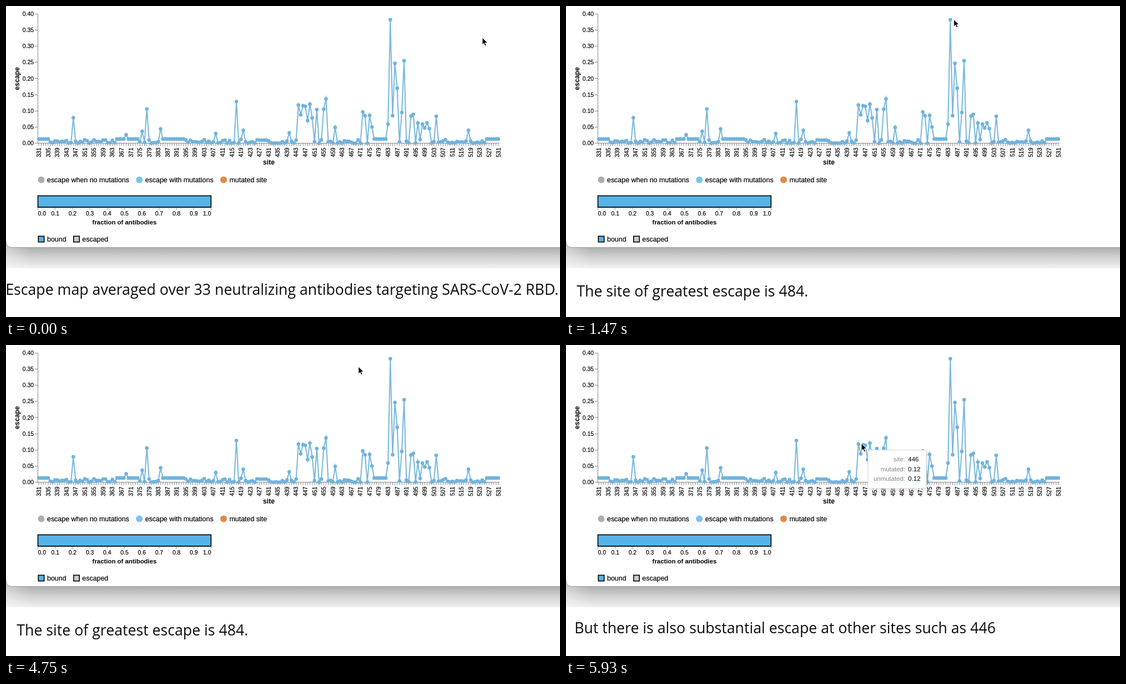
Recreate the animation shown at these times as an HTML page. Size 998x561 px, loop 8 s.

```html
<!DOCTYPE html>
<html lang="en">
<head>
<meta charset="utf-8">
<title>Escape map</title>
<style>
  html, body { margin: 0; width: 100%; height: 100%; overflow: hidden; background: #fff; }
  svg { display: block; width: 998px; height: 561px; }
  text { font-family: "Liberation Sans", Arial, sans-serif; fill: #000; white-space: pre; }
  .label, .legend { stroke: #000; stroke-width: .2px; }
  .label { font-size: 10.4px; }
  .title { font-size: 12.2px; font-weight: bold; }
  .small { font-size: 11.4px; font-weight: bold; }
  .legend { font-size: 12.43px; }
  .tip { font-size: 11.4px; }
  .caption { font-family: "Open Sans", "Noto Sans", sans-serif; font-size: 26.7px; fill: #0c0c0c; }
</style>
</head>
<body>
<svg viewBox="0 0 998 561" xmlns="http://www.w3.org/2000/svg">
  <defs>
    <linearGradient id="shade" x1="0" y1="0" x2="0" y2="1">
      <stop offset=".2" stop-color="#aaa"/>
      <stop offset=".6" stop-color="#d2d2d2"/>
      <stop offset="1" stop-color="#f0f0f0"/>
    </linearGradient>
    <linearGradient id="fade" x1="0" y1="0" x2="1" y2="0">
      <stop offset="0" stop-color="#fff" stop-opacity=".4"/>
      <stop offset="1" stop-color="#fff" stop-opacity="0"/>
    </linearGradient>
    <filter id="drop" x="-10%" y="-10%" width="125%" height="130%">
      <feDropShadow dx="2" dy="2" stdDeviation="2" flood-opacity=".12"/>
    </filter>
  </defs>
  <rect width="998" height="561" fill="#fff"/>
  <rect y="424" width="998" height="49" fill="url(#shade)"/>
  <rect y="424" width="45" height="49" fill="url(#fade)"/>
  <path d="M0 0H998V435.5H11Q0 435.5 0 424Z" fill="#fff"/>
  <path d="M0 424Q0 435.5 11 435.5H998" fill="none" stroke="#a0a0a0"/>
  <g id="chart"></g>
  <text id="caption" class="caption"></text>
  <g id="tip">
    <rect width="105" height="69.5" rx="3" fill="#fff" fill-opacity=".95" stroke="#d9d9d9" filter="url(#drop)"/>
  </g>
  <path id="cursor" d="M0 0V13.2L3 10.4L5.2 15L7.5 14L5.3 9.5H9.4Z" fill="#000" stroke="#fff"/>
</svg>
<script>
const $ = id => document.getElementById(id);
const chart = $("chart"), tip = $("tip"), caption = $("caption"), cursor = $("cursor");

function add(parent, tag, attrs, text) {
  const el = document.createElementNS("http://www.w3.org/2000/svg", tag);
  for (const k in attrs) el.setAttribute(k, attrs[k]);
  if (text !== undefined) el.textContent = text;
  parent.appendChild(el);
  return el;
}
const move = (x, y, turn = 0) => `translate(${x} ${y}) rotate(${turn})`;
const label = (cls, x, y, text, anchor = "start", turn = 0) =>
  add(chart, "text", { class: cls, "text-anchor": anchor, transform: move(x, y, turn) }, text);
const stroke = d => add(chart, "path", { d, fill: "none", stroke: "#888" });
const box = (x, y, width, height, fill) =>
  add(chart, "rect", { x, y, width, height, fill, stroke: "#111", "stroke-width": 1.8 });

// Escape in thousandths: main peaks over a low seeded baseline
const FIRST = 331, LAST = 531;
const peaks = {
  346: 79, 369: 26, 376: 37, 378: 106, 384: 44, 408: 30, 417: 129, 420: 40, 440: 32,
  444: 118, 445: 88, 446: 116, 447: 114, 448: 70, 449: 121, 450: 78, 452: 104, 455: 105, 456: 137,
  460: 49, 472: 97, 473: 85, 475: 86, 476: 50, 483: 59, 484: 382, 485: 85, 486: 247, 487: 170,
  489: 95, 490: 255, 493: 84, 494: 89, 496: 62, 498: 59, 499: 47, 500: 63, 501: 45, 504: 83, 518: 40
};
const plateaus = [[331, 335], [365, 374], [385, 394], [477, 482], [526, 531]];
let seed = 7;
const random = () => (seed = seed * 16807 % 2147483647) / 2147483647;

function escapeAt(site) {
  const low = 12 * random() ** 2;
  if (peaks[site]) return peaks[site];
  return plateaus.some(([a, b]) => site >= a && site <= b) ? 13 : low;
}
const points = [];
for (let site = FIRST; site <= LAST; site++) points.push({ site, value: escapeAt(site) });

const X = site => 59.2 + (site - FIRST) * 4.138;
const Y = value => 247.5 - value * 0.583;

// Axes
let ticks = "M57.5 14V247.5H889";
for (let v = 0; v <= 400; v += 50) {
  ticks += `M52 ${Math.round(Y(v) - .5) + .5}H57.5`;
  label("label", 50, Y(v) + 3.7, (v / 1000).toFixed(2), "end");
}
for (let s = FIRST; s <= LAST; s++) {
  ticks += `M${X(s).toFixed(1)} 247.5V252.5`;
  if ((s - FIRST) % 4 === 0) label("label", X(s) + 3.8, 255.5, s, "end", -90);
}
stroke(ticks);
label("title", 473.5, 286, "site", "middle");
label("title", 24, 131, "escape", "middle", -90);

// Line and dots
add(chart, "polyline", {
  points: points.map(p => `${X(p.site)},${Y(p.value)}`).join(" "),
  fill: "none", stroke: "#7abadf", "stroke-width": 2.1, "stroke-miterlimit": 10
});
for (const p of points) add(chart, "circle", { cx: X(p.site), cy: Y(p.value), r: 3.3, fill: "#70b3dd" });

// Legends
[[63.5, "#adadad", "escape when no mutations"], [240.2, "#78c3ed", "escape with mutations"],
 [392, "#e08a45", "mutated site"]].forEach(([x, fill, text]) => {
  add(chart, "circle", { cx: x, cy: 313.5, r: 6, fill });
  label("legend", x + 10.5, 318, text);
});

let marks = "M57.5 363.5H369.5";
for (let i = 0; i <= 10; i++) {
  const x = 57.5 + i * 31.2;
  marks += `M${x.toFixed(1)} 363.5V367.5`;
  label("label", x, 378, (i / 10).toFixed(1), i === 0 ? "start" : i === 10 ? "end" : "middle");
}
stroke(marks);
box(57.5, 342.4, 311.8, 20.4, "#56b3e8");
label("small", 213.5, 393.5, "fraction of antibodies", "middle");
box(58.3, 415.3, 10.4, 10.4, "#56b3e8");
label("legend", 74, 424.5, "bound");
box(121.8, 415.3, 10.4, 10.4, "#ccc");
label("legend", 137.3, 424.5, "escaped");

// Tooltip rows
const cells = ["site:", "mutated:", "unmutated:"].map((key, i) => {
  const y = 20.5 + i * 17.5;
  add(tip, "text", { class: "tip", x: 67, y, "text-anchor": "end", style: "fill:#858585" }, key);
  return add(tip, "text", { class: "tip", x: 72.3, y });
});

// Timeline
const LOOP = 8000, STEP = 148.25;
const linear = p => p;
const quad = p => 1 - (1 - p) ** 2;
const cubic = p => 1 - (1 - p) ** 3;
const smooth = p => p * p * (3 - 2 * p);

const legs = [ // start, end, x, y, easing of x and y
  [0, 600, 724, 22.5, quad, cubic],
  [600, 1480, 698.5, 24, linear, linear],
  [2075, 2370, 692.5, 24, linear, linear],
  [4595, 5337, 533, 167, quad, smooth],
  [5337, 5780, 532, 177.5, linear, linear]
];
const captions = [
  [0, -0.8, 521, "Escape map averaged over 33 neutralizing antibodies targeting SARS-CoV-2 RBD."],
  [1470, 19.3, 524, "The site of greatest escape is 484."],
  [5640, 15.3, 519.5, "But there is also substantial escape at other sites such as 446"]
];
const hovers = [[0, 0], [2360, 484], [4750, 0], [5790, 446]];
const at = (list, t) => list.filter(k => k[0] <= t).pop();

function pointer(t) {
  const now = Math.floor((t + 13) / STEP) * STEP;
  let x = 858, y = 57;
  for (const [start, end, toX, toY, easeX, easeY] of legs) {
    const p = Math.min(1, Math.max(0, (now - start) / (end - start)));
    x += (toX - x) * easeX(p);
    y += (toY - y) * easeY(p);
  }
  return [x, y];
}

function draw(t) {
  const [px, py] = pointer(t);
  const [, cx, cy, text] = at(captions, t);
  const [, site] = at(hovers, t);
  cursor.setAttribute("transform", move(px, py));
  caption.setAttribute("x", cx);
  caption.setAttribute("y", cy);
  caption.textContent = text;
  tip.style.display = site ? "" : "none";
  if (site) {
    tip.setAttribute("transform", move(px + 12, py + 12));
    const amount = (peaks[site] / 1000).toFixed(2);
    [site, amount, amount].forEach((v, i) => cells[i].textContent = v);
  }
}

const began = performance.now();
function tick() {
  draw((performance.now() - began) % LOOP);
  requestAnimationFrame(tick);
}
tick();
</script>
</body>
</html>
```
